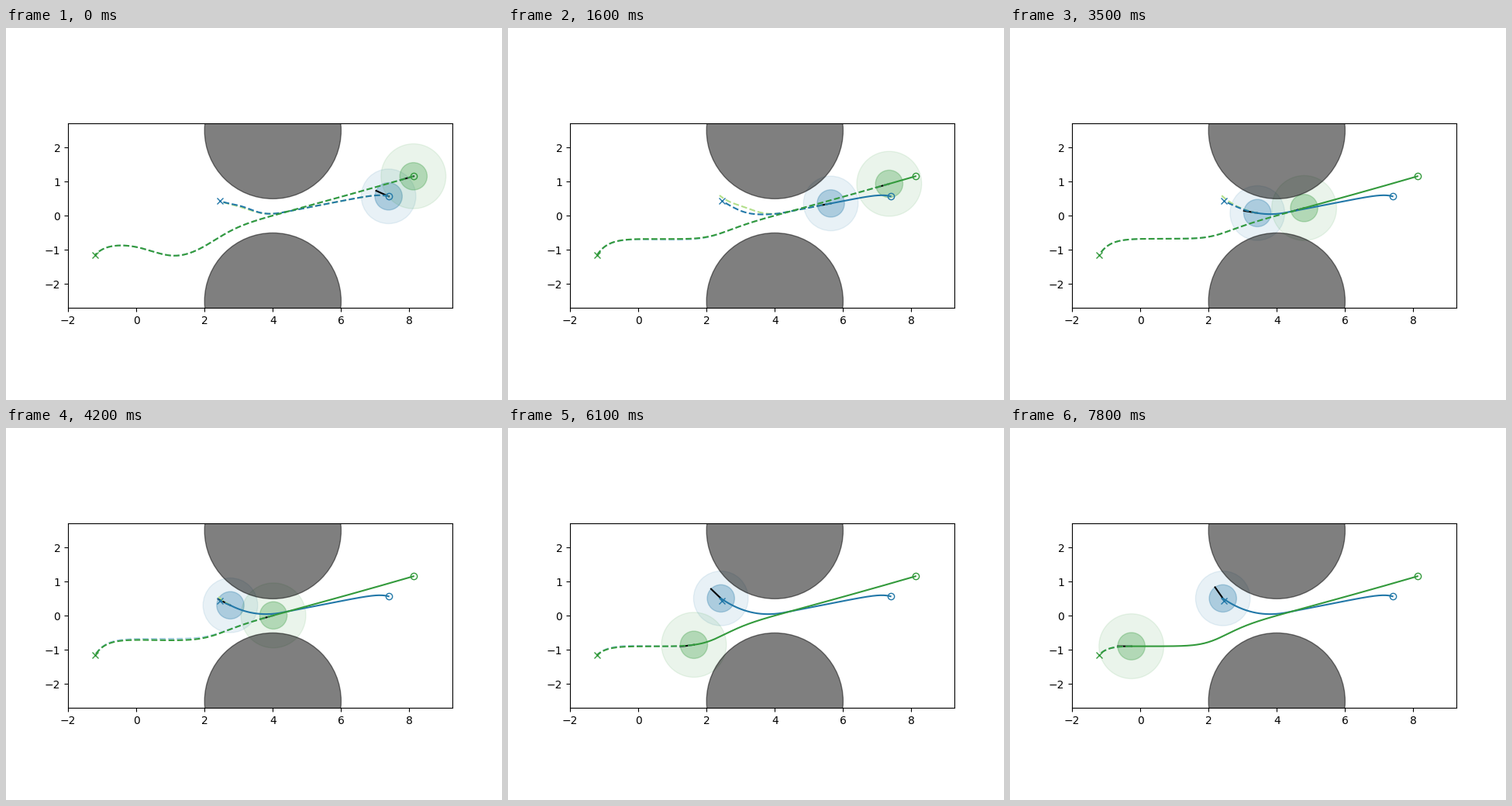
These frames come from a looping animation (640 px wide and 480 px high, 7900 ms). A matplotlib script:

```python
import matplotlib.pyplot as plt
import numpy as np
from matplotlib.animation import FuncAnimation

FRAMES, STEP = 79, 100
BLUE, GREEN = "#2278a8", "#339a3c"
PALE_BLUE, PALE_GREEN = "#a6cee3", "#b2df8a"
BODY = 0.4
LAG = 0.5  # how late blue learns of green's new plan


def smooth(s):
    s = np.clip(s, 0, 1)
    return s * s * (3 - 2 * s)


def bell(x, mid, width):
    return np.exp(-((x - mid) / width) ** 2)


def travel(ts, xs, t):
    """Smooth position through a few (time, x) points."""
    t = min(t, ts[-1])
    i = int(np.clip(np.searchsorted(ts, t) - 1, 0, len(ts) - 2))
    m = np.gradient(xs, ts)
    h = ts[i + 1] - ts[i]
    s = (t - ts[i]) / h
    return (smooth(s) * (xs[i + 1] - xs[i]) + xs[i]
            + h * s * (1 - s) * ((1 - s) * m[i] - s * m[i + 1]))


def green_path(x, base=-0.89, dip=0):
    """Level stretch on the left that merges into the line through the gap."""
    d = 8.12 - x
    line = 1.16 - 0.29 * d + 0.003 * d ** 2
    mix = 1 / (1 + np.exp(-2.75 * (x - 2.28)))
    return base + (line - base) * mix - dip * bell(x, 1.15, 1)


def blue_path(x, bulge=0):
    """Gentle slope with a droop at the start and a rise past the gap."""
    line = 0.175 + 0.197 * (x - 4.68) - 0.137 * np.exp((x - 7.39) / 0.28)
    rise = 0.184 * np.maximum(4.35 - x, 0) ** 2.2
    return line + rise + bulge * bell(x, 3.1, 0.5)


def green_plan(t):
    t = max(t, 0)
    early = np.exp(-t / 0.4)
    base = -0.665 - 0.145 * early - 0.225 * smooth((t - 3.7) / 2.4)
    dip = 0.36 * early + 0.085 * bell(t, 5, 0.7)
    return lambda x: green_path(x, base, dip)


def blue_plan(t):
    bulge = 0.17 * np.exp(-t / 0.4) - 0.05 * smooth((3.5 - t) / 2)
    return lambda x: blue_path(x, bulge)


def blue_guess(t):
    bulge = 0.09 * smooth((3.7 - t) / 1.2)
    return lambda x: blue_path(x, bulge)


def set_plan(line, pos, end, f):
    """Follow f, bent to leave from pos and arrive at end."""
    s = np.linspace(0, 1, 200)
    x = pos[0] + (end[0] - pos[0]) * s
    leave = (pos[1] - f(pos[0])) * (1 - s)
    arrive = (end[1] - f(end[0])) * s * np.exp(-np.abs(x - end[0]) / 0.32)
    line.set_data(x, f(x) + leave + arrive)


class Agent:
    def __init__(self, color, safety, start, goal, path, motion):
        self.color, self.start, self.goal = color, start, goal
        self.path, self.motion = path, motion
        self.discs = [ax.add_patch(plt.Circle(start, r, color=color, alpha=a))
                      for r, a in ((safety, 0.1), (BODY, 0.3))]
        self.nose, = ax.plot([], [], color="k")

    def add_lines(self):
        self.plan, = ax.plot([], [], "--", color=self.color)
        self.trail, = ax.plot([], [], color=self.color)
        ax.plot(*self.start, "o", mfc="none", color=self.color)
        ax.plot(*self.goal, "x", color=self.color)

    def move(self, t, turn=0):
        x = travel(*self.motion, t)
        y = self.path(x)
        for d in self.discs:
            d.center = x, y
        slope = (self.path(x + 0.01) - self.path(x - 0.01)) / 0.02
        a = np.pi + np.arctan(slope) + np.radians(turn)
        self.nose.set_data([x, x + BODY * np.cos(a)], [y, y + BODY * np.sin(a)])
        xs = np.linspace(self.start[0], x, 150)
        self.trail.set_data(xs, self.path(xs))
        return x, y


fig, ax = plt.subplots(figsize=(6.4, 4.8), dpi=100)
ax.set_aspect("equal")
ax.set(xlim=(-2, 9.26), ylim=(-2.7, 2.7),
       xticks=range(-2, 9, 2), yticks=range(-2, 3))

blue = Agent(BLUE, 0.8, (7.39, 0.572), (2.46, 0.43), blue_path,
             ([0, 0.4, 1.6, 2.3, 3.5, 4.4, 5.1],
              [7.39, 7.2, 5.64, 4.68, 3.43, 2.62, 2.42]))
green = Agent(GREEN, 0.95, (8.12, 1.16), (-1.2, -1.14), green_path,
              ([0, 0.8, 1.6, 2.3, 3.5, 5, 6.1, 7.8],
               [8.12, 8.01, 7.35, 6.45, 4.8, 3.13, 1.63, -0.26]))
for cy in (2.5, -2.5):
    ax.add_patch(plt.Circle((4, cy), 2, color="k", alpha=0.5))

guess_green, = ax.plot([], [], "--", color=PALE_BLUE)
guess_blue, = ax.plot([], [], "--", color=PALE_GREEN)
for agent in (blue, green):
    agent.add_lines()


def draw(i):
    t = i * STEP / 1000
    b = blue.move(t, turn=-8 * np.exp(-2 * t) - 6.5 * max(t - 4.7, 0))
    g = green.move(t)
    set_plan(green.plan, g, green.goal, green_plan(t))
    set_plan(guess_green, g, green.goal, green_plan(t - LAG))
    set_plan(blue.plan, b, blue.goal, blue_plan(t))
    drift = np.clip(min(t, 5 - t), 0, 1)
    end = blue.goal[0] - 0.08 * drift, blue.goal[1] + 0.17 * drift
    set_plan(guess_blue, b, end, blue_guess(t))
    return []


anim = FuncAnimation(fig, draw, frames=FRAMES, interval=STEP,
                     repeat=True, repeat_delay=0)
plt.show()
```
